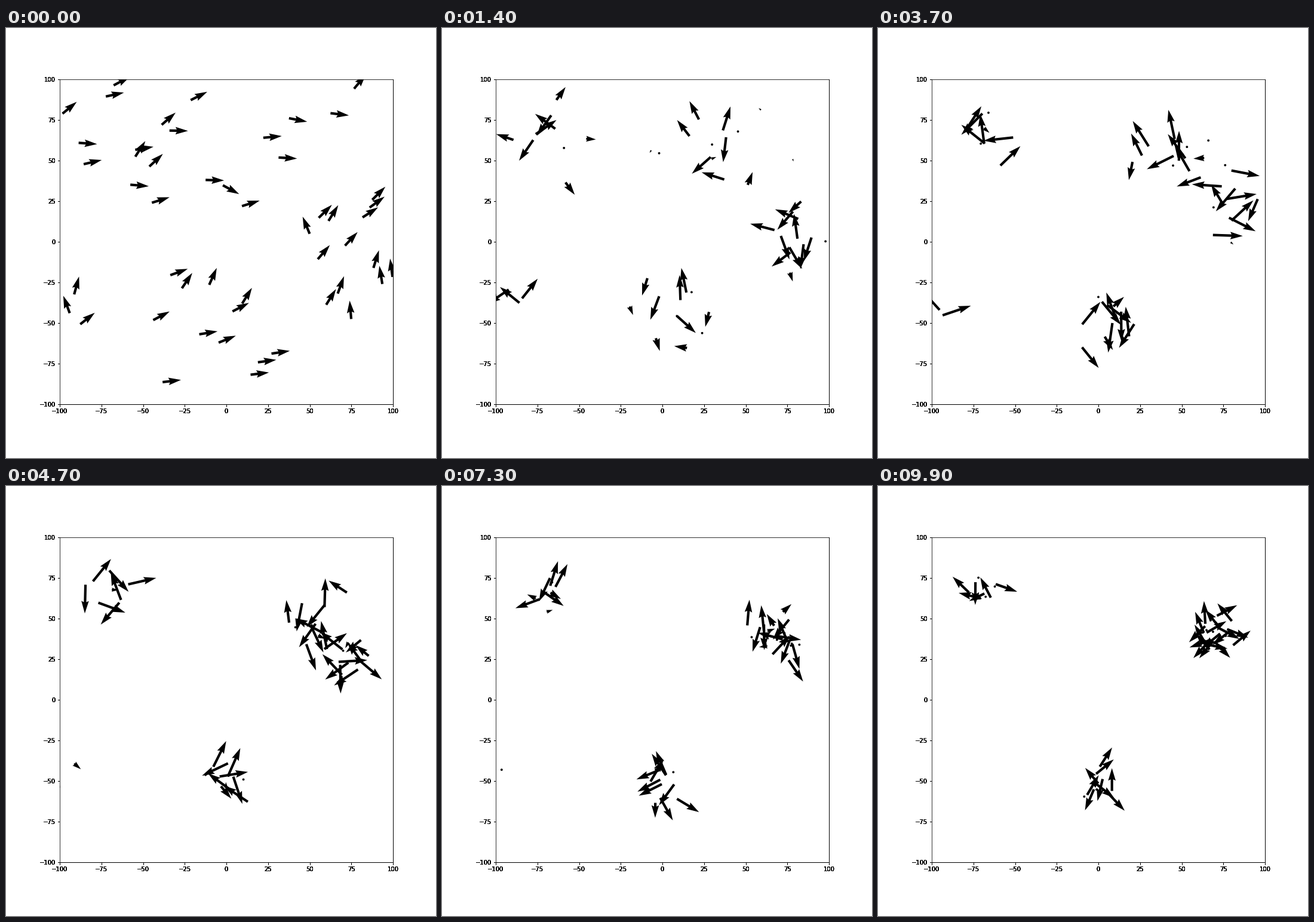
Write a matplotlib script that moves like this. It is 720x720 px and loops after 10000 ms.

```python
import numpy as np
import matplotlib.pyplot as plt
from matplotlib.animation import FuncAnimation

FRAMES, INTERVAL = 100, 100
SIZE, DPI = 720, 72
LEFT, TOP, WIDTH, HEIGHT = 90, 86.4, 558, 543.6
GATHER = 14     # frames of the first, loose gathering
CRUISE = 31     # arrow length at the start, in pixels
ORBIT = 16      # mean orbit radius, in pixels

# Count, mean heading, then boxes (centre x, y, half width, half height)
# at the start, after gathering and at the end, in stage pixels.
FLOCKS = [
    (9, 40, (180, 190, 95, 105), (185, 180, 75, 65), (172, 172, 18, 14)),
    (3, 82, (116, 470, 10, 55), (123, 455, 6, 24), (72, 478, 30, 8)),
    (12, 50, (345, 500, 110, 100), (390, 470, 85, 70), (366, 500, 16, 16)),
    (12, 75, (575, 390, 75, 105), (598, 345, 42, 90), (563, 250, 26, 22)),
    (14, 10, (410, 210, 210, 115), (455, 195, 130, 75), (563, 245, 28, 24)),
]


def lerp(a, b, s):
    return a + (b - a) * s


def spread_out(n, rng):
    """Random points in the unit box, one per row and column band."""
    bands = np.column_stack([rng.permutation(n) for _ in range(2)])
    return (bands + rng.uniform(0.1, 0.9, (n, 2))) / n * 2 - 1


class Flock:
    def __init__(self, count, heading, start, mid, end, rng):
        self.boxes = [np.array(box, float) for box in (start, mid, end)]
        self.place = spread_out(count, rng)
        self.heading = np.radians(heading + rng.uniform(-45, 45, count))
        self.radius = ORBIT * rng.uniform(0.5, 1.4, (count, 2))
        self.rate = rng.uniform(0.18, 0.42, (count, 2)) * rng.choice([-1, 1], (count, 2))
        self.phase = rng.uniform(0, 2 * np.pi, (count, 2))
        self.pulse = rng.uniform(0.15, 0.4, count)

    def box(self, t):
        start, mid, end = self.boxes
        if t <= GATHER:
            return lerp(start, mid, t / GATHER)
        left = 1 - (t - GATHER) / (FRAMES - GATHER)
        return lerp(mid, end, 1 - left ** 2)

    def pose(self, t):
        s = min(t / GATHER, 1)
        box = self.box(t)
        offset = box[2:] * self.place * np.abs(self.place) ** s
        arg = self.rate * t + self.phase
        pos = box[:2] + offset + s * self.radius * np.sin(arg)

        # Headings turn from the first course to the orbit's tangent
        vel = self.radius * self.rate * np.cos(arg)
        tangent = np.arctan2(-vel[:, 1], vel[:, 0])
        turn = (tangent - self.heading + np.pi) % (2 * np.pi) - np.pi
        angle = self.heading + s * turn

        # Stragglers are slow, and every member pauses now and then
        reach = np.interp(t, [GATHER, 37, FRAMES], [42, 50, 38])
        near = np.clip(1.5 - np.hypot(*offset.T) / 80, 0.1, 1)
        beat = np.clip(2.1 + 2.4 * np.sin(self.pulse * t + self.phase[:, 0]), 0, 1)
        length = lerp(CRUISE, reach * near * beat, s)
        return pos, length[:, None] * np.column_stack([np.cos(angle), np.sin(angle)])


rng = np.random.default_rng(7)
flocks = [Flock(*spec, rng) for spec in FLOCKS]


def poses(t):
    pos, arrow = (np.concatenate(part) for part in zip(*(f.pose(t) for f in flocks)))
    x = (pos[:, 0] - LEFT) / WIDTH * 200 - 100
    y = 100 - (pos[:, 1] - TOP) / HEIGHT * 200
    return np.column_stack([x, y]), arrow


fig = plt.figure(figsize=(SIZE / DPI, SIZE / DPI), dpi=DPI, facecolor="white")
rect = [LEFT / SIZE, 1 - (TOP + HEIGHT) / SIZE, WIDTH / SIZE, HEIGHT / SIZE]
ticks = range(-100, 101, 25)
# Stacked axes give the heavy tick labels
for _ in range(6):
    ax = fig.add_axes(rect)
    ax.set(xlim=(-100, 100), ylim=(-100, 100), xticks=ticks, yticks=ticks)

xy, uv = poses(0)
quiver = ax.quiver(*xy.T, *uv.T, scale=1, scale_units="dots", width=0.0075, color="black")


def update(i):
    xy, uv = poses(i)
    quiver.set_offsets(xy)
    quiver.set_UVC(*uv.T)
    return quiver,


anim = FuncAnimation(fig, update, frames=FRAMES, interval=INTERVAL, repeat=True, repeat_delay=0)
plt.show()
```
